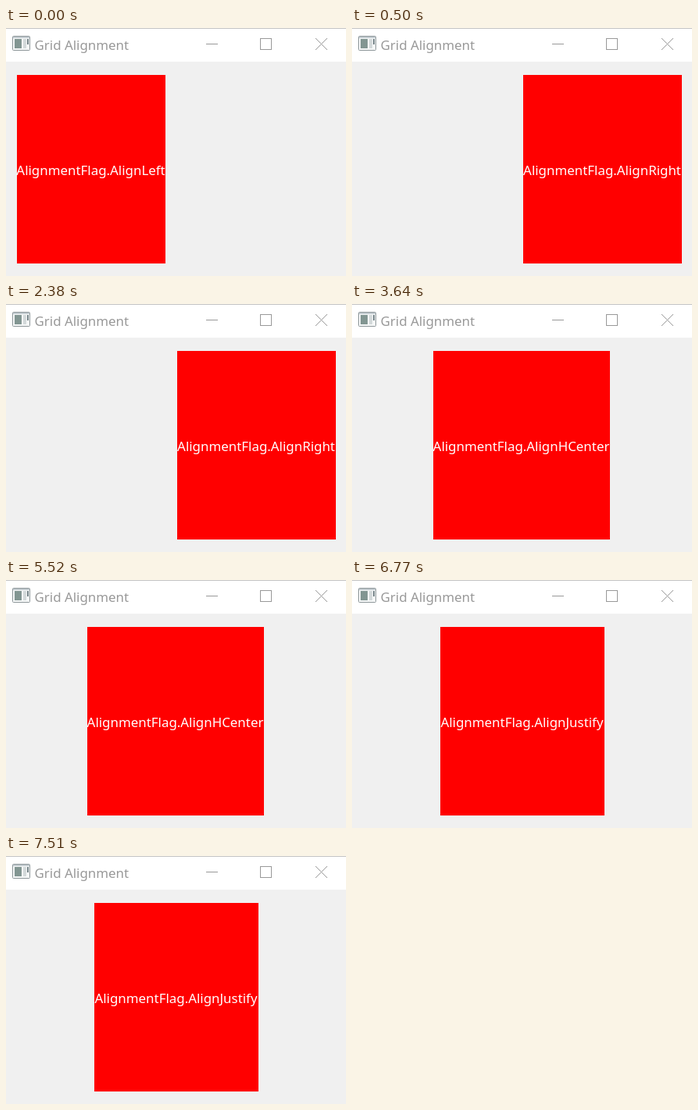
An HTML page with a canvas for the animation above (8000 ms loop, 435 by 317 pixels).

```html
<!DOCTYPE html>
<html lang="en">
<head>
<meta charset="utf-8">
<title>Grid Alignment</title>
<style>
  html, body { margin: 0; width: 100%; height: 100%; overflow: hidden; background: #f0f0f0; }
  canvas { display: block; }
</style>
</head>
<body>
<canvas id="stage" width="435" height="317"></canvas>
<script>
const ctx = document.getElementById('stage').getContext('2d');
const LOOP = 8000;
const FONT = '16.9px "Noto Sans", "Open Sans", sans-serif';
const GRAY = '#999';

const states = [
  { start: 0, align: 'Left', x: 14, width: 190 },
  { start: 500, align: 'Right', x: 219, width: 203 },
  { start: 3640, align: 'HCenter', x: 104, width: 226 },
  { start: 6770, align: 'Justify', x: 113, width: 210 },
];

function fill(color, x, y, w, h) {
  ctx.fillStyle = color;
  ctx.fillRect(x, y, w, h);
}

function line(x1, y1, x2, y2) {
  ctx.beginPath();
  ctx.moveTo(x1, y1);
  ctx.lineTo(x2, y2);
  ctx.stroke();
}

function text(label, x, y, color, align) {
  ctx.font = FONT;
  ctx.textAlign = align;
  ctx.fillStyle = color;
  ctx.fillText(label, x, y);
}

function drawAppIcon() {
  ctx.strokeStyle = '#8d9699';
  ctx.fillStyle = '#f6f8f8';
  ctx.beginPath();
  ctx.roundRect(8.5, 10.5, 22, 18, 1);
  ctx.fill();
  ctx.stroke();
  fill('#c3cbd0', 9, 11, 21, 2);
  fill('#829692', 11, 14, 9, 12);
  fill('#d3d9da', 22, 14, 4, 12);
  fill('#77858a', 27, 14, 2, 7);
}

function drawTitleBar() {
  fill('#fff', 0, 0, 435, 43);
  fill('#c4c4c4', 0, 0, 435, 1);
  drawAppIcon();
  text('Grid Alignment', 36.5, 28, GRAY, 'left');

  ctx.strokeStyle = GRAY;
  ctx.lineWidth = 1;
  line(256, 20.5, 271, 20.5);
  ctx.strokeRect(325.5, 13.5, 14, 14);
  line(396, 13, 411, 28);
  line(411, 13, 396, 28);
}

function draw(time) {
  const { align, x, width } = states.findLast(s => s.start <= time);
  fill('#f0f0f0', 0, 0, 435, 317);
  drawTitleBar();
  fill('#f00', x, 60, width, 241);
  text('AlignmentFlag.Align' + align, x + width / 2 - 0.5, 188, '#fff', 'center');
}

function tick() {
  draw(performance.now() % LOOP);
  requestAnimationFrame(tick);
}
tick();
</script>
</body>
</html>
```
